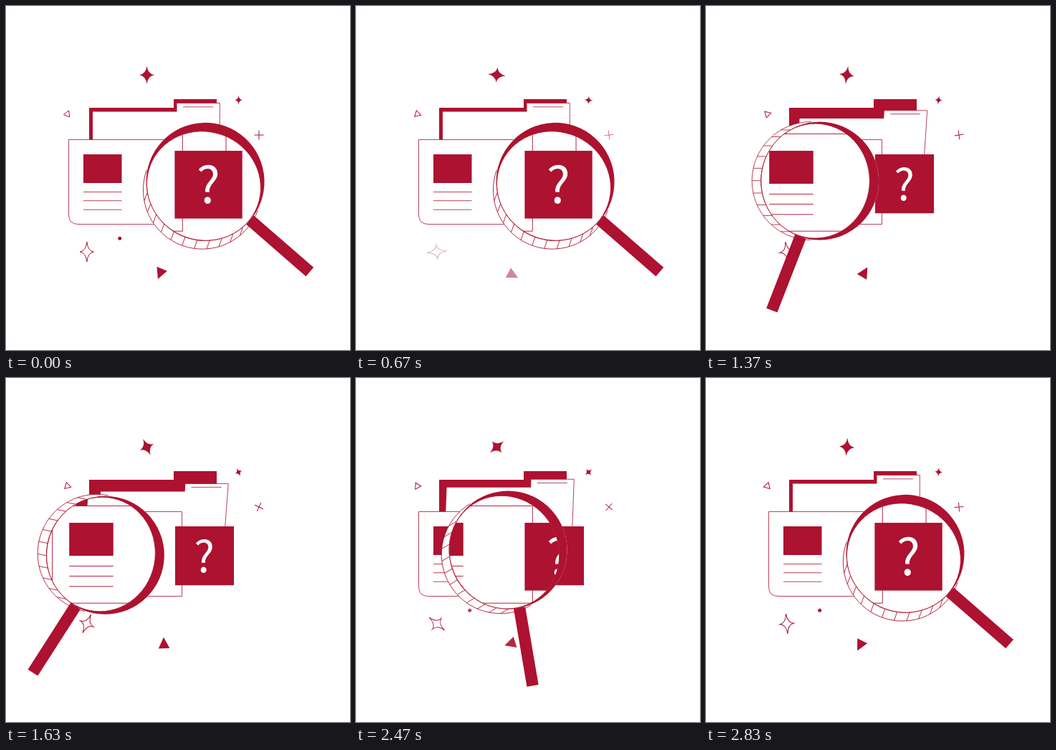
Animation of 480 by 480 pixels, one loop 2.87 s. Source, as an HTML page with a canvas:

```html
<!DOCTYPE html>
<html lang="en">
<head>
<meta charset="utf-8">
<title>Folder search</title>
<style>
html, body { margin: 0; width: 100%; height: 100%; overflow: hidden; background: #fff; }
canvas { display: block; width: 480px; height: 480px; }
</style>
</head>
<body>
<canvas id="stage"></canvas>
<script>
const RED = '#ad1230', LOOP = 2870, TAU = Math.PI * 2, DEG = Math.PI / 180;
const canvas = document.getElementById('stage');
const ctx = canvas.getContext('2d');
const ratio = window.devicePixelRatio || 1;
canvas.width = canvas.height = 480 * ratio;

// cubic-bezier(.25, .1, .25, 1)
function ease(x) {
  if (x <= 0) return 0;
  if (x >= 1) return 1;
  const at = (s, a, b) => 3 * s * (1 - s) * (1 - s) * a + 3 * s * s * (1 - s) * b + s * s * s;
  let lo = 0, hi = 1;
  for (let i = 0; i < 24; i++) {
    const mid = (lo + hi) / 2;
    if (at(mid, 0.25, 0.25) < x) lo = mid; else hi = mid;
  }
  return at(lo, 0.1, 1);
}

// 0: lens on the right, 1: lens on the left
const swing = t => ease((t - 1062) / 545) - ease((t - 2305) / 545);

function poly(pts) {
  ctx.beginPath();
  pts.forEach(([x, y]) => ctx.lineTo(x, y));
  ctx.closePath();
}

function line(x1, y1, x2, y2) {
  ctx.beginPath();
  ctx.moveTo(x1, y1);
  ctx.lineTo(x2, y2);
  ctx.stroke();
}

function disc(x, r) {
  ctx.beginPath();
  ctx.arc(x, 0, r, 0, TAU);
}

function at(x, y, turn, alpha, draw) {
  ctx.save();
  ctx.translate(x, y);
  ctx.rotate(turn);
  ctx.globalAlpha = alpha;
  draw();
  ctx.restore();
}

// glyph centred on its ink, with the given ink height
function glyph(ch, x, y, height) {
  const font = size => `500 ${size}px "Noto Sans CJK JP", "Noto Sans CJK SC", "Noto Sans CJK", "Open Sans", sans-serif`;
  ctx.textAlign = 'left';
  ctx.font = font(100);
  const m = ctx.measureText(ch);
  const up = m.actualBoundingBoxAscent, down = m.actualBoundingBoxDescent;
  const k = height / (up + down);
  ctx.font = font(100 * k);
  const mid = (m.actualBoundingBoxRight - m.actualBoundingBoxLeft) / 2;
  ctx.fillText(ch, x - mid * k, y + (up - down) / 2 * k);
}

function drawFolder(p) {
  ctx.fillStyle = ctx.strokeStyle = RED;
  ctx.lineWidth = 0.8;
  poly([[116, 188], [116, 142], [234, 142], [234, 130], [294, 130], [294, 188]]);
  ctx.fill();

  // sheet leaning with the swing, hinged at its base
  const lean = (x, y) => {
    const ny = 304 - (304 - y) * (1 - 12 * p / 169);
    return [x + 12 * p * (304 - ny) / 157, ny];
  };
  ctx.fillStyle = '#fff';
  poly([lean(121, 280), lean(121, 147.4), lean(238.5, 147.4), lean(238.5, 135.5), lean(298.3, 135.5), lean(298.3, 280)]);
  ctx.fill();
  line(...lean(238.5, 135.5), ...lean(298.3, 135.5));
  line(...lean(298.3, 135.5), ...lean(298.3, 280));
  line(...lean(247, 140.8), ...lean(289, 140.8));

  ctx.beginPath();
  ctx.moveTo(87.5, 186.5);
  ctx.lineTo(245.5, 186.5);
  ctx.lineTo(245.5, 304.5);
  ctx.lineTo(101, 304.5);
  ctx.quadraticCurveTo(87.5, 304.5, 87.5, 291);
  ctx.closePath();
  ctx.fill();
  ctx.stroke();

  ctx.fillStyle = RED;
  ctx.fillRect(108, 207, 53.5, 40);
  for (const y of [259.5, 271.7, 284.2]) line(108, y, 161.5, y);

  ctx.fillRect(236, 207, 82, 82.2);
  ctx.fillStyle = '#fff';
  glyph('?', 276.6, 247.6, 47.4);
}

function star(rx, ry, c) {
  ctx.beginPath();
  ctx.moveTo(0, -ry);
  ctx.quadraticCurveTo(c, -c, rx, 0);
  ctx.quadraticCurveTo(c, c, 0, ry);
  ctx.quadraticCurveTo(-c, c, -rx, 0);
  ctx.quadraticCurveTo(-c, -c, 0, -ry);
  ctx.closePath();
}

function triangle(x, y, r, tip, angle) {
  poly([tip, r, r].map((len, i) => {
    const a = angle + i * TAU / 3;
    return [x + len * Math.cos(a), y + len * Math.sin(a)];
  }));
}

function drawSparks(t) {
  const turn = TAU * t / LOOP;
  const dip = Math.max(0, -Math.cos(2 * turn));
  ctx.fillStyle = ctx.strokeStyle = RED;
  ctx.lineWidth = 1;
  at(196.5, 96.3, -turn, 1, () => { star(10.5, 12.5, 1.5); ctx.fill(); });
  at(324.5, 131.3, -turn, 1, () => { star(5.4, 6.2, 0.6); ctx.fill(); });
  at(112.8, 343, turn, 1 - 0.68 * dip, () => { star(9.5, 14, 1.2); ctx.stroke(); });
  at(353, 180, turn, 1 - 0.45 * dip, () => { line(-6.5, 0, 6.5, 0); line(0, -6.5, 0, 6.5); });
  at(85.6, 150.8, turn, 1, () => { triangle(0, 0, 5.2, 5.2, 172 * DEG); ctx.stroke(); });
  at(218, 372.3, -turn, 1 - 0.5 * dip, () => { triangle(-2, -1.4, 9, 11, 112 * DEG); ctx.fill(); });
  at(158.7, 324.3, 0, 1 - dip, () => { disc(0, 2.5); ctx.fill(); });
}

function drawLens(p) {
  const x = 276 - 143.5 * p, y = 251 - 5 * p - 22 * p * (1 - p);
  const angle = (-70 + 81.7 * p) * DEG;
  const place = () => { ctx.translate(x, y); ctx.rotate(angle); };
  const R = 82.5, depth = 6, rx = 75.7, ry = 80;
  const glass = () => ctx.ellipse(0, 0, rx, ry, 0, 0, TAU);

  ctx.save();
  place();
  ctx.fillStyle = '#fff';
  for (const c of [-depth, depth]) { disc(c, R); ctx.fill(); }
  ctx.restore();

  // magnified view
  ctx.save();
  place();
  ctx.beginPath();
  glass();
  ctx.clip();
  ctx.rotate(-angle);
  ctx.translate(240 - x, 240 - y);
  ctx.scale(1.15, 1.15);
  ctx.translate(-240, -240);
  drawFolder(p);
  ctx.restore();

  ctx.save();
  place();
  ctx.fillStyle = ctx.strokeStyle = RED;
  ctx.lineWidth = 0.8;

  // ribbed side of the rim
  ctx.beginPath();
  ctx.arc(-depth, 0, R, 90 * DEG, 270 * DEG);
  ctx.stroke();
  for (let i = -5; i <= 5; i++) {
    const a = Math.PI + i * 12.5 * DEG, v = ry * Math.sin(a);
    line(rx * Math.cos(a), v, -depth - Math.sqrt(R * R - v * v), v);
  }

  // thick side of the rim
  ctx.save();
  disc(depth, R);
  ctx.clip();
  ctx.beginPath();
  glass();
  ctx.rect(-100, -100, 200, 200);
  ctx.fill('evenodd');
  ctx.restore();
  ctx.beginPath();
  glass();
  ctx.stroke();

  ctx.rotate(111 * DEG);
  ctx.fillRect(80, -14.6 - 2.8 * p, 110.3, 16.4);
  ctx.restore();
}

function frame(now) {
  const t = now % LOOP, p = swing(t);
  ctx.setTransform(ratio, 0, 0, ratio, 0, 0);
  ctx.fillStyle = '#fff';
  ctx.fillRect(0, 0, 480, 480);
  drawFolder(p);
  drawSparks(t);
  drawLens(p);
}

let start = null;
function tick(now) {
  if (start === null) start = now;
  frame(Math.max(0, now - start));
  requestAnimationFrame(tick);
}
frame(0);
requestAnimationFrame(tick);
</script>
</body>
</html>
```
